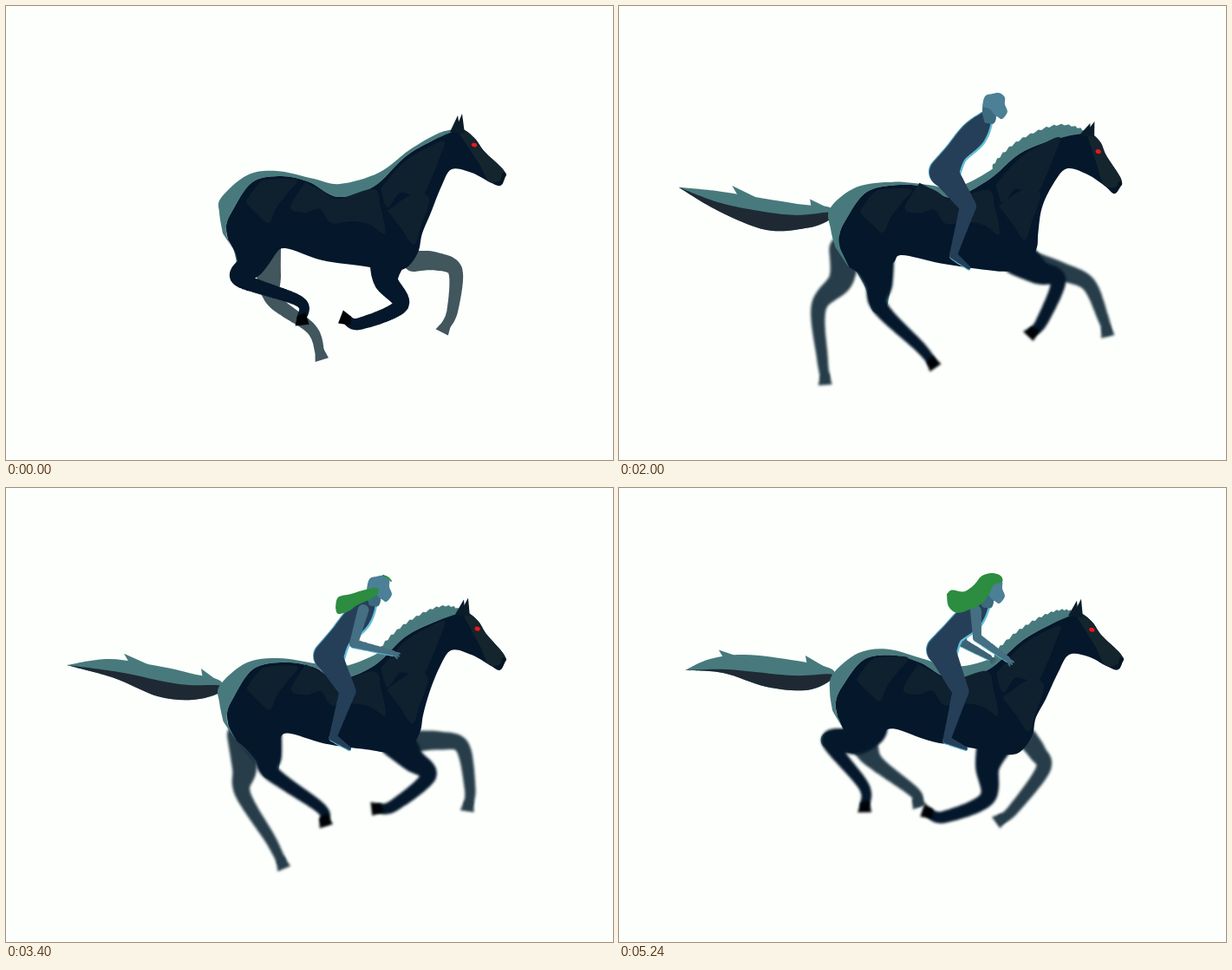
An HTML page with a canvas for the animation above (5280 ms loop, 700 by 523 pixels).

```html
<!DOCTYPE html>
<html lang="en">
<head>
<meta charset="utf-8">
<title>Gallop</title>
<style>
html, body { margin: 0; width: 100%; height: 100%; overflow: hidden; background: #fcfffc; }
canvas { display: block; }
</style>
</head>
<body>
<canvas id="stage" width="700" height="523"></canvas>
<script>
const ctx = document.getElementById('stage').getContext('2d');
const STEP = 40, STRIDE = 12, STRIDES = 11;
const TEAL = '#487a7d', NAVY = '#04172b', PATCH = '#0f212f', CYAN = '#62bdd8', SKIN = '#4b8096', SUIT = '#263f59', GREEN = '#2c8c40';

// Poses are flat x,y lists, keyed by the phase within a stride of 12 steps.
// Body: outer back line (10), inner back line (10), head to flank (22), ear tip, eye.
const body = {
  0: [250,262,246,238,248,221,278,195,312,190,355,199,385,205,430,192,465,166,500,146,
      256,269,254,253,261,236,284,203,318,196,350,203,383,220,424,208,460,174,490,156,
      520,143,529,143,541,153,552,168,573,188,575,197,570,207,558,203,537,192,514,188,502,208,
      490,238,480,262,475,284,461,302,440,305,414,300,365,293,322,279,308,288,285,300,264,283,
      526,124,540,160],
  3: [247,280,242,262,241,234,272,211,318,205,358,208,388,212,428,190,462,163,510,145,
      253,280,252,266,259,248,285,216,325,208,360,211,385,221,428,198,465,170,510,154,
      549,149,557,152,564,161,568,175,583,203,581,213,574,221,562,209,544,196,520,189,502,207,
      488,233,485,262,485,277,478,292,455,306,420,305,370,297,325,289,315,298,290,315,263,304,
      560,138,560,172],
  8: [233,248,232,232,240,197,268,181,308,178,345,195,388,213,430,207,472,179,520,161,
      238,250,236,234,243,214,275,188,312,187,345,199,383,220,430,211,475,187,520,166,
      558,155,567,157,574,166,580,181,599,206,600,217,592,224,575,213,558,203,538,205,520,228,
      498,258,485,274,484,290,468,310,445,312,415,305,355,292,300,276,282,281,255,292,238,264,
      570,146,571,179]
};

// Legs: top, mid, hock or knee, fetlock, hoof.
const nearHind = {
  0: [288,275,283,297,271,315,338,340,342,364], 1: [293,283,302,308,306,328,362,368,369,386],
  3: [290,290,291,325,283,360,315,410,336,434], 5: [280,285,262,315,215,340,192,398,183,425],
  6: [277,280,240,302,190,322,138,372,112,390], 8: [268,265,225,281,182,280,174,340,146,351],
  11: [285,275,273,291,243,292,282,343,284,370]
};
const farHind = {
  0: [300,280,303,310,310,340,352,372,364,404], 1: [272,285,275,323,273,352,305,405,320,435],
  3: [252,275,240,305,195,335,172,395,163,420], 5: [250,270,215,295,175,300,130,350,104,370],
  6: [250,266,215,280,180,278,165,335,136,350], 8: [245,265,230,264,207,268,207,340,196,364],
  11: [280,280,285,300,298,318,340,350,346,364]
};
const nearFore = {
  0: [440,290,438,316,455,345,408,366,389,360], 1: [450,290,468,312,487,332,447,366,425,370],
  3: [470,290,495,303,522,308,526,360,523,385], 5: [475,292,510,315,545,338,576,370,590,388],
  7: [465,295,468,330,478,370,490,415,502,437], 8: [450,298,440,325,433,365,424,415,432,438],
  10: [437,295,425,325,400,362,355,388,330,392], 11: [434,292,425,320,424,358,375,379,353,373]
};
const farFore = {
  0: [470,294,495,294,518,305,515,350,505,373], 1: [470,292,500,291,526,298,535,345,533,369],
  3: [480,298,515,322,545,345,566,376,577,391], 5: [460,302,465,330,470,370,485,415,490,436],
  6: [440,302,435,330,428,365,418,415,420,437], 8: [418,302,400,333,375,363,330,385,309,393],
  10: [445,292,440,318,450,345,400,367,380,362], 11: [470,288,482,304,489,324,455,370,438,384]
};
// Tail: tip, three points on top, root top and bottom, three below, two inside.
const tail = {
  1: [70,204,120,197,180,206,215,214,247,222,246,236,215,244,175,240,125,219,130,212,200,226],
  3: [69,214,110,226,160,232,205,236,242,237,241,249,220,261,165,269,105,248,115,240,195,249],
  8: [80,218,112,194,160,180,210,180,246,188,238,201,210,210,170,214,115,212,125,206,195,197],
  11: [76,210,105,197,145,192,205,199,246,209,242,223,215,233,170,229,120,213,125,209,200,216]
};
// Rider: hip, waist, chest, shoulder, knee, ankle, toe, elbow, hand, far elbow, far hand.
const rider = {
  1: [372,194,385,172,405,150,419,131,394,234,377,287,396,300,401,179,446,190,395,178,436,196],
  3: [378,188,391,167,411,146,425,129,412,226,396,286,414,301,408,178,452,192,398,176,440,196],
  5: [379,184,392,162,412,140,426,122,420,216,412,276,436,286,420,172,458,192,400,172,440,192],
  8: [374,192,387,170,408,150,423,131,424,210,434,264,460,264,438,172,464,200,403,175,436,197],
  11: [372,187,384,168,404,150,419,133,394,234,378,290,400,300,413,172,448,197,396,178,427,195]
};
const pairs = flat => flat.flatMap((v, i) => i % 2 ? [] : [[v, flat[i + 1]]]);
const head = pairs([-2,-3,-3,-13,0,-26,8,-29,17,-30,23,-25,23,-17,26,-9,23,-3,19,0,13,-3,10,5,0,4]);
const hair = pairs([-41,-8,-35,-13,-21,-12,-9,-21,-1,-31,11,-35,21,-32,23,-25,13,-21,8,-11,-1,1,-14,8,-29,13,-39,6,-41,-8]);
const backHair = pairs([-39,7,-36,-5,-21,-9,-4,-14,9,-16,10,-9,1,-3,-14,4,-24,11,-36,14,-39,7]);
// Lighter patches on the coat, each tied to one body point.
const patches = [
  [13, [277,224,290,206,302,200,335,200,325,215,312,232,303,250,290,240,278,228]],
  [16, [345,203,365,213,383,222,424,211,432,232,437,262,420,252,400,248,375,250,362,234,345,238,328,232]],
  [18, [432,210,460,179,490,161,506,156,500,175,490,200,478,220,455,215,440,232]],
  [31, [440,236,470,216,488,222,478,255,470,275,455,255]]
];

// Periodic Hermite spline through the keyed poses.
function pose(keys, p) {
  const ts = Object.keys(keys).map(Number), n = ts.length;
  const T = i => ts[(i + n) % n] + STRIDE * Math.floor(i / n);
  const K = i => keys[ts[(i + n) % n]];
  let i = -1;
  while (T(i + 1) <= p) i++;
  const d = T(i + 1) - T(i), u = (p - T(i)) / d, u2 = u * u, u3 = u2 * u;
  const slope = (j, k) => (K(j + 1)[k] - K(j - 1 + n)[k]) / (T(j + 1) - T(j - 1));
  return pairs(K(i).map((v, k) =>
    (2 * u3 - 3 * u2 + 1) * v + (u3 - 2 * u2 + u) * d * slope(i, k) +
    (3 * u2 - 2 * u3) * K(i + 1)[k] + (u3 - u2) * d * slope(i + 1, k)));
}

const shift = (pts, dx, dy) => pts.map(([x, y]) => [x + dx, y + dy]);
const mix = (a, b, t) => a.map((v, i) => v + (b[i] - v) * t);

function poly(pts, color) {
  ctx.fillStyle = color;
  ctx.beginPath();
  pts.forEach(p => ctx.lineTo(...p));
  ctx.fill();
}

// Filled smooth curve through the points, with a corner at the start.
function blob(pts, color) {
  ctx.fillStyle = color;
  ctx.beginPath();
  ctx.moveTo(...pts[0]);
  for (let i = 0; i < pts.length - 1; i++) {
    const [a, b, c, d] = [pts[i - 1] || pts[i], pts[i], pts[i + 1], pts[i + 2] || pts[i + 1]];
    ctx.bezierCurveTo(b[0] + (c[0] - a[0]) / 6, b[1] + (c[1] - a[1]) / 6,
      c[0] - (d[0] - b[0]) / 6, c[1] - (d[1] - b[1]) / 6, ...c);
  }
  ctx.fill();
}

function curveAt(pts, s) {
  const i = Math.min(Math.floor(s), pts.length - 2), u = s - i;
  const [a, b, c, d] = [pts[i - 1] || pts[i], pts[i], pts[i + 1], pts[i + 2] || pts[i + 1]];
  return b.map((v, k) => v + u / 2 * (c[k] - a[k] +
    u * (2 * a[k] - 5 * v + 4 * c[k] - d[k] + u * (3 * (v - c[k]) + d[k] - a[k]))));
}

// Tapered limb along a curve.
function limb(pts, widths, color) {
  const rows = pts.map((p, i) => [...p, widths[i]]);
  ctx.fillStyle = color;
  ctx.beginPath();
  for (let s = 0; s <= pts.length - 1; s += 1 / 24) {
    const [x, y, w] = curveAt(rows, s);
    ctx.moveTo(x + w / 2, y);
    ctx.arc(x, y, Math.max(w / 2, 1), 0, 7);
  }
  ctx.fill();
}

function leg(pts, widths, color, hoof, blur) {
  ctx.filter = blur ? `blur(${blur}px)` : 'none';
  limb([...pts.slice(0, 4), mix(pts[3], pts[4], .8)], widths, color);
  const [a, b] = [pts[3], pts[4]], len = Math.hypot(b[0] - a[0], b[1] - a[1]);
  const ux = (b[0] - a[0]) / len, uy = (b[1] - a[1]) / len;
  const at = (f, s) => [b[0] + ux * f - uy * s, b[1] + uy * f + ux * s];
  poly([at(-10, -5), at(-8, 5), at(3, 9), at(4, -7)], hoof);
  ctx.filter = 'none';
}

function drawTail(p) {
  const t = pose(tail, p);
  const spike = mix(t[1], t[2], .3);
  poly([[spike[0] - 2, spike[1] - 9], [spike[0] + 5, spike[1] + 3], mix(t[1], t[2], .75)], TEAL);
  poly([[t[3][0] + 10, t[3][1] - 6], [t[3][0] + 12, t[3][1] + 6], mix(t[3], t[4], .85)], TEAL);
  blob([...t.slice(0, 9), t[0]], TEAL);
  blob([t[0], t[9], t[10], mix(t[4], t[5], .4), ...t.slice(5, 9), t[0]], '#1f2934');
}

function drawMane(b, p) {
  const crest = [b[7], b[8], b[9], b[20]], top = [], base = [];
  const height = 6 + 3 * Math.cos(p * Math.PI / 6);
  for (let i = 0; i <= 45; i++) {
    const s = .1 + 2.85 * i / 45, a = curveAt(crest, s), c = curveAt(crest, s + .04);
    const len = Math.hypot(c[0] - a[0], c[1] - a[1]);
    const h = height * Math.sin(Math.PI * i / 45) ** .5 + (i % 3 - 1) * .9;
    top.push([a[0] + (c[1] - a[1]) / len * h, a[1] - (c[0] - a[0]) / len * h]);
    base.unshift([a[0] + 1, a[1] + 3]);
  }
  poly([...top, ...base], TEAL);
}

function drawHorse(p, stride) {
  const b = pose(body, p), front = b.slice(20, 42), poll = b[20], ear = b[42], eye = b[43];
  const blur = stride ? 1.6 : 0, far = stride ? '#273d49' : '#41565d';
  leg(pose(farHind, p), [34, 28, 18, 13, 11], far, far, blur);
  leg(pose(farFore, p), [24, 21, 17, 13, 11], far, far, blur);
  if (stride > 1) drawTail(p);
  const hind = pose(nearHind, p);
  limb(shift(hind.slice(0, 3), -1.5, -1.5), [50, 32, 19], TEAL);
  leg(hind, [50, 32, 19, 13, 11], NAVY, '#000306', blur);
  leg(pose(nearFore, p), [42, 28, 18, 14, 11], NAVY, '#000306', blur);
  if (stride) drawMane(b, p);
  blob([...b.slice(0, 10), poll, ...b.slice(10, 20).reverse(), b[41], b[0]], TEAL);
  blob([...b.slice(10, 20), ...front], NAVY);
  const rest = pairs(body[0]);
  for (const [k, pts] of patches)
    blob(shift(pairs([...pts, pts[0], pts[1]]), b[k][0] - rest[k][0], b[k][1] - rest[k][1]), PATCH);
  blob([b[20], b[21], b[22], b[23], b[24], b[25], b[27], mix(b[23], b[28], .5), b[20]], '#14252e');
  for (const [dx, dy] of [[-5, 2], [0, 0]])
    poly([[poll[0] - 3 + dx, poll[1] + 2], [ear[0] + dx, ear[1] + dy], [poll[0] + 9 + dx, poll[1] + 4]], '#0c1d2a');
  limb([mix(b[24], b[25], .7), mix(b[25], b[26], .7)], [5, 3], '#071520');
  ctx.fillStyle = '#f0151b';
  ctx.beginPath();
  ctx.ellipse(eye[0], eye[1], 3.2, 2.4, .3, 0, 7);
  ctx.fill();
}

function drawArm(from, elbow, hand, color) {
  limb(shift([elbow, hand], 0, 1.5), [9, 5], CYAN);
  limb([from, elbow], [13, 10], color);
  limb([elbow, hand], [10, 6], color);
  const dx = hand[0] - elbow[0], dy = hand[1] - elbow[1], angle = Math.atan2(dy, dx);
  for (const turn of [-.15, .25, .65])
    limb([hand, [hand[0] + 8 * Math.cos(angle + turn), hand[1] + 8 * Math.sin(angle + turn)]], [4, 2], color);
}

function drawRider(p, stride) {
  const r = pose(rider, p), [hip, waist, chest, neck, knee, ankle, toe, elbow, hand, elbow2, hand2] = r;
  const torso = r.slice(0, 4), girth = [34, 25, 29, 16];
  if (stride > 7) drawArm(mix(waist, chest, .6), elbow2, hand2, '#3d6273');
  limb(shift(torso, 2, 1.5), girth, CYAN);
  limb(shift(torso, -1, -.7), girth, '#4d9ab5');
  limb(shift([ankle, toe], 0, 1.2), [9, 4], CYAN);
  limb([hip, knee], [32, 19], SUIT);
  limb([knee, ankle], [19, 9], SUIT);
  limb([ankle, toe], [9, 4], SUIT);
  limb(torso, girth, SUIT);
  const place = pts => shift(pts, ...neck);
  if (stride > 3) {
    blob(place(head), SKIN);
    blob(place(pairs([-2,-3,-2,-13,5,-12,10,-6,13,-2,10,5,0,4])), '#3c6a7e');
  }
  if (stride > 4) drawArm(mix(chest, neck, .5), elbow, hand, '#456f82');
  const lift = 3 + 4 * Math.cos((p - 8) * Math.PI / 6);
  if (stride > 7) blob(place(hair.map(([x, y]) => [x, y - lift * Math.max(0, 8 - x) / 50])), GREEN);
  else if (stride > 6) {
    blob(place(backHair), GREEN);
    limb(place([[16, -30], [21, -28], [25, -24]]), [2, 2, 2], GREEN);
  }
}

let last = -1;
function tick() {
  const step = Math.floor(performance.now() / STEP) % (STRIDE * STRIDES);
  if (step !== last) {
    last = step;
    const p = step % STRIDE, stride = Math.floor(step / STRIDE);
    ctx.fillStyle = '#fcfffc';
    ctx.fillRect(0, 0, 700, 523);
    drawHorse(p, stride);
    if (stride > 2) drawRider(p, stride);
  }
  requestAnimationFrame(tick);
}
tick();
</script>
</body>
</html>
```
